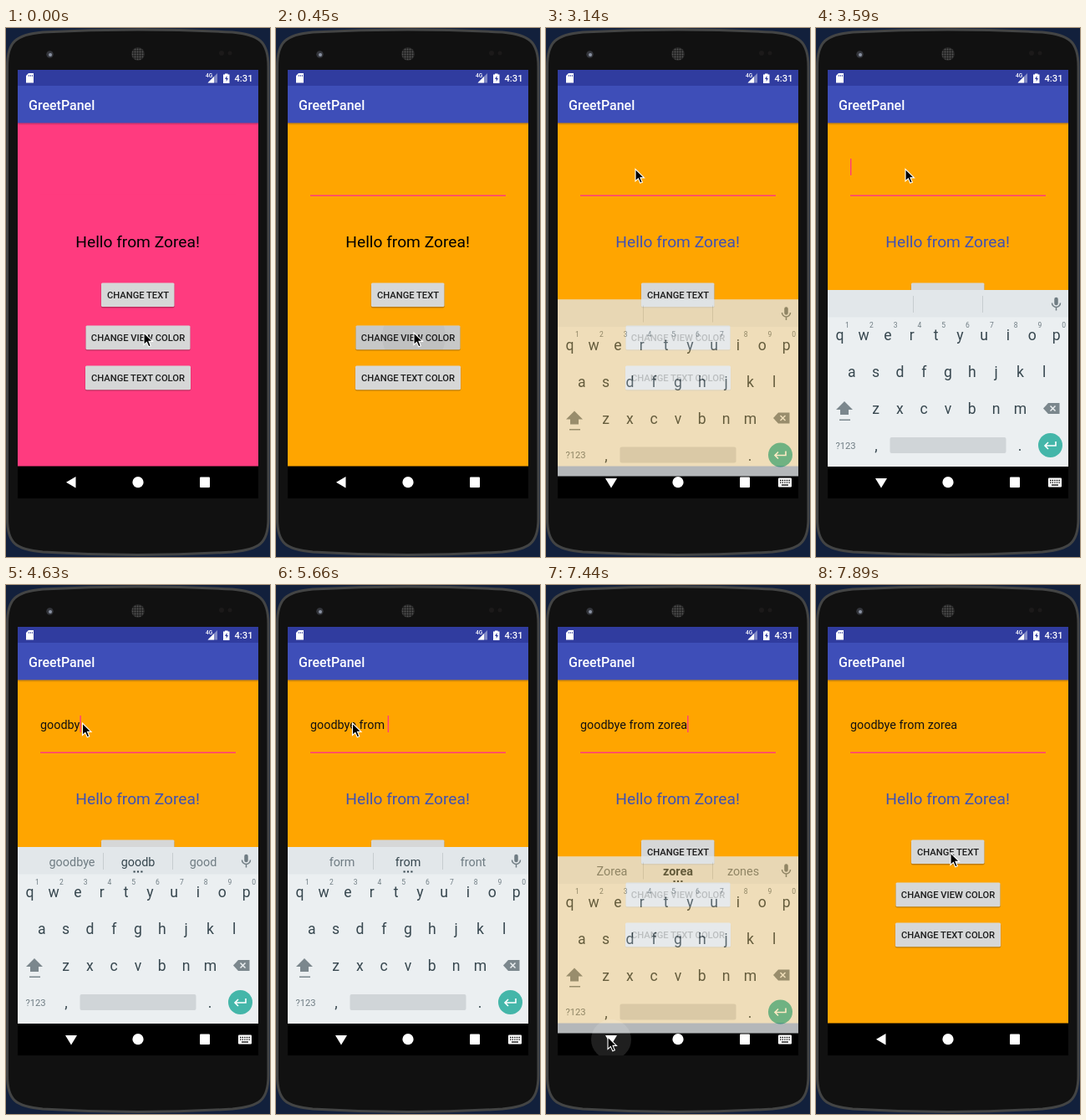
Animation of 316x632 px, one loop 8 s. Source, as an HTML page:

```html
<!DOCTYPE html>
<html>
<head>
<meta charset="utf-8">
<style>
html, body { margin: 0; width: 100%; height: 100%; overflow: hidden; background: #12203c; }
svg { display: block; width: 316px; height: 632px; font-family: Roboto, sans-serif; }
text { white-space: pre; }
.mid { text-anchor: middle; }
.medium { font-weight: 500; }
</style>
</head>
<body>
<svg viewBox="0 0 316 632">
  <defs>
    <clipPath id="screen"><path d="M14 50h288v512H14z"/></clipPath>
    <linearGradient id="shade" x2="0" y2="1">
      <stop stop-opacity=".2"/><stop offset="1" stop-opacity="0"/>
    </linearGradient>
    <pattern id="mesh" width="3" height="3" patternUnits="userSpaceOnUse">
      <circle cx="1.5" cy="1.5" r="1" fill="#555"/>
    </pattern>
  </defs>

  <!-- phone body -->
  <path d="M1.500 46C1.500 16 12 8 44 5Q158 -1 271 5C303 8 314 16 314 46V586C314 616 303 623 271 626Q158 633 44 626C12 623 1.500 616 1.500 586Z" fill="#111" stroke="#434444" stroke-width="3"/>
  <circle cx="52.500" cy="31.500" r="4.200" fill="#34363c"/>
  <circle cx="53" cy="32" r="2" fill="#8a92a2"/>
  <circle cx="158" cy="31" r="8" fill="#222"/>
  <circle cx="158" cy="31" r="7.500" fill="url(#mesh)"/>
  <circle cx="258" cy="30" r="3" fill="#1c1a1a"/>
  <circle cx="268" cy="30" r="2.500" fill="#1c1a1a"/>

  <g clip-path="url(#screen)">
    <rect id="view" x="14" y="113" width="288" height="411"/>
    <path d="M14 69h288v44.500H14z" fill="#3e4eb8"/>
    <rect x="14" y="113.500" width="288" height="3" fill="url(#shade)"/>
    <path d="M14 50h288v19H14z" fill="#303c9f"/>
    <text class="medium" x="27" y="98" font-size="16" fill="#fff">GreetPanel</text>

    <!-- status bar -->
    <g fill="#fff">
      <path d="M27 54h6v11.500h-9V57z"/>
      <path d="M27.500 56v2m2-2v2m2-2v2" stroke="#303c9f" stroke-width=".8"/>
      <text class="medium" x="239" y="59" font-size="6.500">4G</text>
      <path d="M253 54v11.500h-11.500z" opacity=".4"/>
      <path d="M249 58v7.500h-7.500z"/>
      <path d="M262 54.500h3.500v1h2V66h-7.500V55.500h2z"/>
      <path d="M264.500 57l-2.500 4h1.700v3l2.300-4h-1.500z" fill="#303c9f"/>
      <text class="medium" x="273.500" y="64" font-size="11.200">4:31</text>
    </g>

    <!-- app content -->
    <path d="M41 200.300h234" stroke="#ff3b7f" stroke-width="1.600"/>
    <text id="typed" x="41" y="172" font-size="14.400" fill="#111"></text>
    <rect id="underline" y="173.500" height="1" fill="#111"/>
    <rect id="caret" y="156" width="1.400" height="20" fill="#ff3b7f"/>
    <text id="hello" x="83.300" y="262" font-size="19.200">Hello from Zorea!</text>
    <g id="buttons"></g>
    <path d="M14 523.500h288V562H14z"/>

    <g id="board">
      <path d="M14 313h288v211H14z" fill="#ebeff1"/>
      <path d="M14 313h288v32.500H14z" fill="#e2e7ea"/>
      <path d="M116.500 320v20m83-20v20" stroke="#c6ccd0"/>
      <g id="words" font-size="14.400" fill="#6f7c83" class="mid">
        <text x="79" y="335.500"></text>
        <text x="158" y="335.500" fill="#37474f"></text>
        <text x="236" y="335.500"></text>
      </g>
      <path id="dots" d="M152.500 342.500h2.200m2.200 0h2.200m2.200 0h2.200" stroke="#37474f" stroke-width="2"/>
      <g fill="none" stroke="#6f7c83" stroke-width="1.500">
        <path d="M287.500 324v5" stroke-width="4.500" stroke-linecap="round"/>
        <path d="M282.500 328.500a5 5 0 0 0 10 0M287.500 333.500v4"/>
      </g>
      <g id="keys" class="mid" font-size="17.600" fill="#37474f"></g>
      <path d="M34 446l10 10h-5v6H29v-6h-5zM28 467.500h13v1.600H28z" fill="#7b878d"/>
      <path d="M278 448h13.500v13H278l-6-6.500z" fill="#7b878d"/>
      <path d="M280.500 451.500l6 6m0-6l-6 6" stroke="#ebeff1" stroke-width="1.500"/>
      <rect x="88.500" y="489" width="139" height="19" rx="2" fill="#d0d5d8"/>
      <circle cx="280.500" cy="498.500" r="14.500" fill="#44b6a9"/>
      <path d="M287 494v5h-13m4-4l-4 4 4 4" fill="none" stroke="#fff" stroke-width="1.600"/>
    </g>

    <!-- navigation bar -->
    <circle id="tap" cx="78" cy="543" r="24" fill="#fff" opacity=".12"/>
    <g fill="#fff">
      <path id="back"/>
      <circle cx="158" cy="542.700" r="6.600"/>
      <rect x="232" y="536.500" width="12" height="12.500" rx="1"/>
      <g id="switcher">
        <rect x="278" y="537.500" width="16" height="11" rx="1"/>
        <path d="M280 540.500h12m-12 2.700h12" stroke="#000" stroke-width="1.300" stroke-dasharray="1.400 1.200"/>
        <path d="M282 546h8" stroke="#000" stroke-width="1.300"/>
      </g>
    </g>
  </g>
  <path id="mouse" d="M0 0V14.500L3.400 11.400 5.800 16.800 8.300 15.700 6 10.400H10.500Z" stroke="#fff" stroke-width="1.100"/>
</svg>
<script>
const el = id => document.getElementById(id);
const set = (id, attrs) => { for (const a in attrs) el(id).setAttribute(a, attrs[a]); };
const show = (id, on) => { el(id).style.display = on ? '' : 'none'; };

const LOOP = 8000, STEP = 148.8;
const MESSAGE = 'goodbye from zorea', LAST_WORD = 13;
// Suggestions for each number of typed letters
const HINTS = ['', 'got g go', 'going go got', 'good goo goof', 'goodbye good goods', 'goodbye goodb good',
  'goodbye goodby good', 'goodbyes goodbye good', 'and to for', 'for f from', 'from fr free', 'from fro front',
  'form from front', 'the my a', 'zoo z zone', 'zoo zo zone', 'Zorea zor zone', 'Zorea zore zones', 'Zorea zorea zones'];
// Pointer path: step, x, y
const PATH = [[0, 165, 364], [6, 165, 364], [9, 154, 418], [13, 154, 418], [15, 136.5, 211], [17, 107, 168.5],
  [26, 107, 168.5], [28, 91.5, 165], [42, 91.5, 165], [45, 52, 502], [47, 74, 540], [50, 74, 540], [53, 161, 320]];
// Keyboard while it slides: step -> [offset, opacity]
const SLIDE = { 21: [11.5, .77], 50: [11.5, .77], 51: [30, .3] };

const button = (label, x, y, w, id) => `
  <clipPath id="${id}Clip"><rect x="${x}" y="${y}" width="${w}" height="28.700" rx="1.500"/></clipPath>
  <rect x="${x - .3}" y="${y + 1}" width="${w + .6}" height="29" rx="2" opacity=".25"/>
  <rect x="${x}" y="${y}" width="${w}" height="28.700" rx="1.500" fill="#d6d7d7"/>
  <g id="${id}" clip-path="url(#${id}Clip)">
    <rect x="${x}" y="${y}" width="${w}" height="29" opacity=".07"/>
    <circle id="${id}Wave" cy="${y + 13}" opacity=".035"/>
  </g>
  <text class="mid medium" x="158" y="${Math.round(y + 18.5)}" font-size="11.200" fill="#1c1c1c">${label}</text>`;
el('buttons').innerHTML = button('CHANGE TEXT', 114, 304.4, 87.5, 'rip1') +
  button('CHANGE VIEW COLOR', 95.5, 355.5, 125, 'rip2') +
  button('CHANGE TEXT COLOR', 95, 403.5, 126, 'rip3');

const row = (letters, x, y) => [...letters].map((c, i) => `<text x="${x + 28.8 * i}" y="${y}">${c}</text>`).join('');
el('keys').innerHTML = row('qwertyuiop', 28.4, 373) + row('asdfghjkl', 42.8, 417) + row('zxcvbnm', 71.6, 461) +
  row(',', 72, 505) + row('.', 244, 505) +
  '<text x="35.500" y="502.500" font-size="11.200" fill="#6f7c83">?123</text>' +
  `<g font-size="8.500" fill="#6f7c83">${row('1234567890', 37.5, 357.5)}</g>`;

function pointer(k) {
  const i = Math.max(1, PATH.findIndex(p => p[0] >= k));
  const [a, ax, ay] = PATH[i - 1], [b, bx, by] = PATH[i], f = (k - a) / (b - a);
  return [ax + (bx - ax) * f, ay + (by - ay) * f];
}

const lettersAt = k => k < 27 ? 0 : k < 42 ? k - 25 : 18;

function ripple(id, x, age) {
  show(id, age === 0 || age === 1);
  set(id + 'Wave', { cx: x, r: age ? 38 : 24 });
}

function draw(k) {
  set('view', { fill: k < 2 ? '#ff3b7f' : '#ffa500' });
  set('hello', { fill: k < 11 ? '#000' : '#3f51b5' });
  ripple('rip1', 161, -1);
  ripple('rip2', 165, k - 2);
  ripple('rip3', 154, k - 11);

  const n = lettersAt(k), typed = el('typed');
  typed.textContent = MESSAGE.slice(0, n);
  const widthOf = m => m ? typed.getSubStringLength(0, m) : 0;
  const end = 41 + widthOf(n);
  const blink = k < 27 ? (k * 149 + 470) % 1000 < 500 : k < 42 || (k - 42) % 7 < 4;
  set('caret', { x: end });
  show('caret', k > 1 && blink);
  const underlined = n > LAST_WORD && k < 50;
  show('underline', underlined);
  if (underlined) {
    const start = 41 + widthOf(LAST_WORD);
    set('underline', { x: start, width: end - start });
  }

  const [shift, alpha] = SLIDE[k] || [0, 1];
  show('board', k > 20 && k < 52);
  set('board', { transform: `translate(0 ${shift})`, opacity: alpha });
  const seen = lettersAt(k - 1), words = HINTS[seen].split(' ');
  [...el('words').children].forEach((t, i) => t.textContent = words[i] || '');
  el('words').children[1].style.fontWeight = seen === 18 ? 700 : 400;
  show('dots', seen);

  const open = k > 20 && k < 51;
  set('back', { d: open ? 'M71 538h14l-7 11.500z' : 'M83.500 536v13.500L72 542.700z' });
  show('switcher', open);
  show('tap', k > 48 && k < 52);
  set('mouse', { transform: `translate(${pointer(k)})` });
}

const begin = performance.now();
function tick() {
  draw(Math.floor((performance.now() - begin) % LOOP / STEP));
  requestAnimationFrame(tick);
}
tick();
</script>
</body>
</html>
```
